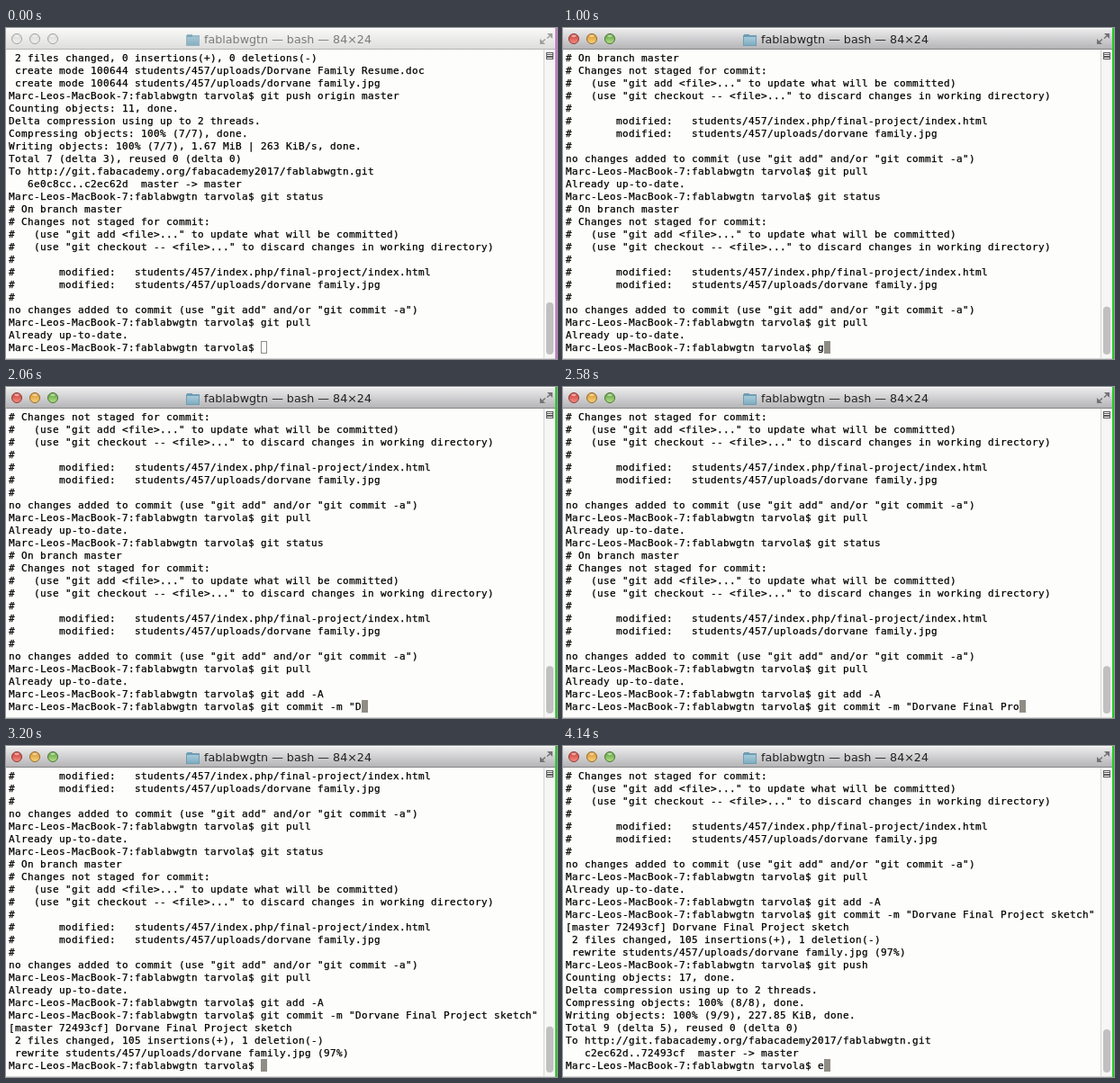
An HTML page with a canvas for the animation above (4.16 s loop, 612 px wide and 368 px high).

```html
<!DOCTYPE html>
<html lang="en">
<head>
<meta charset="utf-8">
<title>Terminal</title>
<style>
html, body { margin: 0; width: 612px; height: 368px; overflow: hidden; background: #fdfdfb; }
canvas { display: block; }
</style>
</head>
<body>
<canvas id="stage" width="612" height="368"></canvas>
<script>
const ctx = document.getElementById('stage').getContext('2d');
const LOOP = 4160, ROWS = 24, COLS = 84, CELL = 7, LINE = 14;
const LEFT = 3, TOP = 26, FOCUS_AT = 80;
const PAPER = '#fdfdfb', CURSOR = '#8f8d85';

const PROMPT = 'Marc-Leos-MacBook-7:fablabwgtn tarvola$ ';
const STATUS = `# On branch master
# Changes not staged for commit:
#   (use "git add <file>..." to update what will be committed)
#   (use "git checkout -- <file>..." to discard changes in working directory)
#
#       modified:   students/457/index.php/final-project/index.html
#       modified:   students/457/uploads/dorvane family.jpg
#
no changes added to commit (use "git add" and/or "git commit -a")
`;
const HISTORY = ` 2 files changed, 0 insertions(+), 0 deletions(-)
 create mode 100644 students/457/uploads/Dorvane Family Resume.doc
 create mode 100644 students/457/uploads/dorvane family.jpg
${PROMPT}git push origin master
Counting objects: 11, done.
Delta compression using up to 2 threads.
Compressing objects: 100% (7/7), done.
Writing objects: 100% (7/7), 1.67 MiB | 263 KiB/s, done.
Total 7 (delta 3), reused 0 (delta 0)
To http://git.fabacademy.org/fabacademy2017/fablabwgtn.git
   6e0c8cc..c2ec62d  master -> master
${PROMPT}git status
${STATUS}${PROMPT}git pull
Already up-to-date.
${PROMPT}`;

// Session: text appended to the buffer at given times
const events = [];
const print = (at, text) => events.push({ at, text });
const type = (at, step, text) => [...text].forEach((c, i) => print(at + i * step, c));

type(100, 22, 'git status');
print(330, '\n');
print(345, STATUS + PROMPT);
type(370, 16, 'git pull');
print(510, '\n');
print(920, 'Already up-to-date.\n' + PROMPT);
type(990, 30, 'git add -A');
print(1300, '\n');
print(1480, PROMPT);
type(1550, 33, 'git commit -m "Dorvane Final Project sketch"');
print(3000, '\n');
print(3060, `[master 72493cf] Dorvane Final Project sketch
 2 files changed, 105 insertions(+), 1 deletion(-)
 rewrite students/457/uploads/dorvane family.jpg (97%)
${PROMPT}`);
type(3240, 28, 'git push');
print(3480, '\n');
print(3560, 'Counting objects: 17, done.\nDelta compression using up to 2 threads.\n');
print(3640, 'Compressing objects: 100% (8/8), done.\n');
print(3780, 'Writing objects: 100% (9/9), 227.85 KiB, done.\nTotal 9 (delta 5), reused 0 (delta 0)\n');
print(4000, `To http://git.fabacademy.org/fabacademy2017/fablabwgtn.git
   c2ec62d..72493cf  master -> master
${PROMPT}`);
print(4120, 'e');

function linesAt(t) {
  const text = HISTORY + events.filter(e => e.at <= t).map(e => e.text).join('');
  const lines = text.split('\n');
  if (lines[lines.length - 1].length === COLS) lines.push('');
  return lines;
}

function rect(color, x, y, w, h) {
  ctx.fillStyle = color;
  ctx.fillRect(x, y, w, h);
}

function shape(color, pts) {
  ctx.fillStyle = color;
  ctx.beginPath();
  pts.forEach(([x, y]) => ctx.lineTo(x, y));
  ctx.fill();
}

function vertical(y0, y1, a, b) {
  const g = ctx.createLinearGradient(0, y0, 0, y1);
  g.addColorStop(0, a);
  g.addColorStop(1, b);
  return g;
}

function button(x, dark, light, rim) {
  ctx.beginPath();
  ctx.arc(x, 12, 5.5, 0, 7);
  ctx.fillStyle = vertical(7, 17, dark, light);
  ctx.fill();
  ctx.lineWidth = 1;
  ctx.strokeStyle = rim;
  ctx.stroke();
  ctx.fillStyle = 'rgba(255,255,255,.5)';
  ctx.beginPath();
  ctx.ellipse(x, 8.8, 2.8, 1.4, 0, 0, 7);
  ctx.fill();
}

function folder(active) {
  ctx.globalAlpha = active ? 1 : 0.65;
  rect('#6f9db3', 201, 7, 6, 3);
  rect('#6f9db3', 200, 8, 15, 12);
  rect(vertical(10, 19, '#a6cbdb', '#80adc0'), 201, 10, 13, 9);
  ctx.globalAlpha = 1;
}

function titleBar(active) {
  rect(active ? vertical(1, 23, '#ebebec', '#b5b5b7') : vertical(1, 23, '#f8f8f7', '#dededd'), 0, 1, 610, 22);
  rect(active ? '#858586' : '#b4b4b2', 0, 23, 610, 1);
  if (active) {
    button(12, '#c9403c', '#f58a80', '#8f3a36');
    button(32, '#d8932a', '#f8d27a', '#94692a');
    button(52, '#5c9f3c', '#b4dd88', '#47762f');
  } else {
    [12, 32, 52].forEach(x => button(x, '#d8d8d6', '#f0f0ee', '#a2a2a0'));
  }
  folder(active);
  ctx.font = '12.7px "DejaVu Sans", sans-serif';
  ctx.fillStyle = active ? '#222' : '#7b7b78';
  ctx.fillText('fablabwgtn — bash — 84×24', 220, 17);

  const tone = active ? '#737373' : '#a0a09e';
  shape(tone, [[601, 6], [607, 6], [607, 12]]);
  shape(tone, [[593, 12], [593, 18], [599, 18]]);
  ctx.strokeStyle = tone;
  ctx.lineWidth = 1.5;
  ctx.beginPath();
  ctx.moveTo(605, 8);
  ctx.lineTo(601, 11.5);
  ctx.moveTo(595, 16);
  ctx.lineTo(599, 12.5);
  ctx.stroke();
}

function scrollBar(scroll) {
  rect('#f6f6f5', 597, 24, 13, 343);
  rect('#d6d6d4', 597, 24, 1, 343);
  rect('#5c5c5c', 600, 27, 8, 8);
  rect('#f7f7f6', 601, 28, 6, 6);
  [29, 31, 32].forEach(y => rect('#5c5c5c', 601, y, 6, 1));
  const y = 305 + scroll * 0.4;
  ctx.fillStyle = '#c0c0c0';
  ctx.beginPath();
  ctx.roundRect(600, y, 8, 363 - y, 4);
  ctx.fill();
}

function terminal(lines, active) {
  const rows = lines.slice(-ROWS);
  const x = LEFT + rows[ROWS - 1].length * CELL;
  const y = TOP + (ROWS - 1) * LINE;
  ctx.lineWidth = 1;
  if (active) {
    rect(CURSOR, x, y, CELL, LINE);
  } else {
    ctx.strokeStyle = CURSOR;
    ctx.strokeRect(x + 0.5, y + 0.5, CELL - 1, LINE - 1);
  }
  ctx.font = '11px "DejaVu Sans Mono", monospace';
  ctx.fillStyle = ctx.strokeStyle = '#000';
  ctx.lineWidth = 0.25; // slightly heavier strokes
  rows.forEach((row, r) => [...row].forEach((c, i) => {
    if (c === ' ') return;
    const at = [c, LEFT + i * CELL, TOP + 11 + r * LINE];
    ctx.fillText(...at);
    ctx.strokeText(...at);
  }));
}

function draw(t) {
  const active = t >= FOCUS_AT;
  const lines = linesAt(t);
  rect(PAPER, 0, 0, 612, 368);
  titleBar(active);
  terminal(lines, active);
  scrollBar(lines.length - ROWS);
  rect('#d8d8d6', 0, 367, 610, 1);
  rect(active ? '#27c827' : '#c878c8', 610, 0, 2, 368);
}

const start = performance.now();
function tick() {
  draw((performance.now() - start) % LOOP);
  requestAnimationFrame(tick);
}
tick();
</script>
</body>
</html>
```
